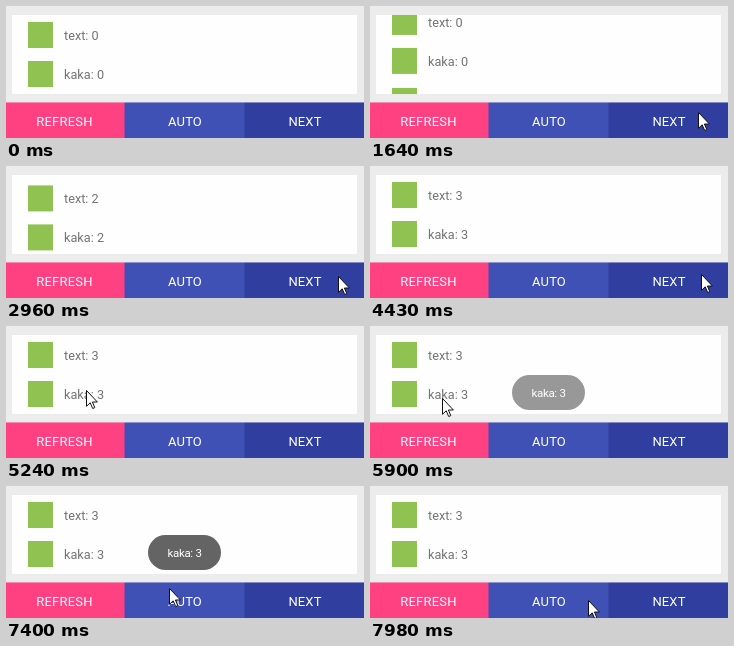
An HTML page for the animation above (8000 ms loop, 358x132 px).

```html
<!DOCTYPE html>
<html lang="en">
<head>
<meta charset="utf-8">
<title>List pager</title>
<style>
  html, body { margin: 0; width: 100%; height: 100%; overflow: hidden; }
  body { position: relative; background: #ececec; font: 13px Roboto, Arial, sans-serif; }
  #card, #bar, #toast, #cursor { position: absolute; }
  #card { left: 6px; top: 9px; width: 345px; height: 79px; overflow: hidden; background: #fefefe; }
  #list { padding-top: .5px; }
  .row { position: relative; height: 39.5px; line-height: 40px; padding-left: 52px; color: #737373; font-size: 12.7px; }
  .row i { position: absolute; left: 16px; top: 6px; width: 25px; height: 26px; background: #8fc251; }
  #bar { left: 0; top: 96px; width: 358px; height: 36px; display: grid; grid-template-columns: 118px 121px 119px;
    line-height: 39px; text-align: center; color: #fff; letter-spacing: .15px;
    background: linear-gradient(90deg, #ff4081 118px, #3f51b5 119px 238px, #303f9f 239px);
    box-shadow: inset 0 1px rgba(236, 236, 236, .45); }
  #bar span { text-indent: 1px; }
  #bar span:first-child { text-indent: -1px; letter-spacing: .2px; }
  #toast { left: 142px; top: 49px; width: 73px; height: 35px; border-radius: 18px; background: #646464;
    color: #fff; font-size: 11.5px; letter-spacing: -.3px; line-height: 37px; text-align: center; }
  #cursor { left: 0; top: 0; overflow: visible; }
</style>
</head>
<body>
<div id="card"><div id="list"></div></div>
<div id="bar"><span>REFRESH</span><span>AUTO</span><span>NEXT</span></div>
<div id="toast">kaka: 3</div>
<svg id="cursor" width="12" height="19">
  <path d="M.5.5V16.3L4.2 12.8L6.7 18.5L8.8 17.6L6.4 12H11.4Z" fill="#fff" stroke="#111" stroke-linejoin="round"/>
</svg>
<script>
const LOOP = 8000, TICK = 60, PAGE = 79;
const get = id => document.getElementById(id);
const list = get('list'), toast = get('toast'), cursor = get('cursor');

for (let n = 0; n < 4; n++)
  for (const name of ['text', 'kaka']) {
    const row = document.createElement('div');
    row.className = 'row';
    row.append(document.createElement('i'), `${name}: ${n}`);
    list.append(row);
  }

const smooth = p => (1 - Math.cos(Math.PI * p)) / 2;

// Progress from 0 to 1 in even ticks, the first one already at the start time.
function progress(t, start, end) {
  if (t < start) return 0;
  const gaps = Math.round((end - start) / TICK);
  const done = Math.floor((t - start + 8) * gaps / (end - start)) + 1;
  return Math.min(1, done / (gaps + 1));
}

// Each move begins where the one before it ended; "via" bends the path.
const entry = [334, 134];
const moves = [
  { start: 740, end: 920, to: [320, 104] },
  { start: 1100, end: 1210, to: [328, 106] },
  { start: 1930, end: 2050, to: [332, 110] },
  { start: 4430, end: 5180, to: [82, 62], via: [290, 16] },
  { start: 5240, end: 5350, to: [72, 72] },
  { start: 6250, end: 7050, to: [119, 75] },
  { start: 7110, end: 7870, to: [218, 114], via: [180, 119] }
];

function pointer(t) {
  const n = moves.filter(m => t >= m.start).length - 1;
  if (n < 0) return null;
  const { start, end, to, via } = moves[n];
  const from = n ? moves[n - 1].to : entry;
  const p = smooth(progress(t, start, end)), q = 1 - p;
  return from.map((a, i) => {
    const bend = via ? via[i] : (a + to[i]) / 2;
    return Math.round(q * q * a + 2 * p * q * bend + p * p * to[i]);
  });
}

// A page turn is an eased 300 ms slide, first seen 80 ms in.
function turn(t, start) {
  const p = progress(t, start, start + 4 * TICK);
  return p && smooth(Math.min(1, p + 1 / 15));
}

const page = t => turn(t, 1640) + turn(t, 2730) + turn(t, 3890);

function toastAlpha(t) {
  const shown = 1 - (1 - progress(t, 5720, 6080)) ** 1.25;
  return shown * (1 - progress(t, 7630, 7980));
}

function draw(t) {
  list.style.transform = `translateY(${-PAGE * page(t)}px)`;
  toast.style.opacity = toastAlpha(t);
  const at = pointer(t);
  cursor.style.visibility = at ? 'visible' : 'hidden';
  if (at) cursor.style.transform = `translate(${at[0]}px, ${at[1]}px)`;
}

let origin;
function frame(now) {
  origin ??= now;
  draw((now - origin) % LOOP);
  requestAnimationFrame(frame);
}
draw(0);
requestAnimationFrame(frame);
</script>
</body>
</html>
```
